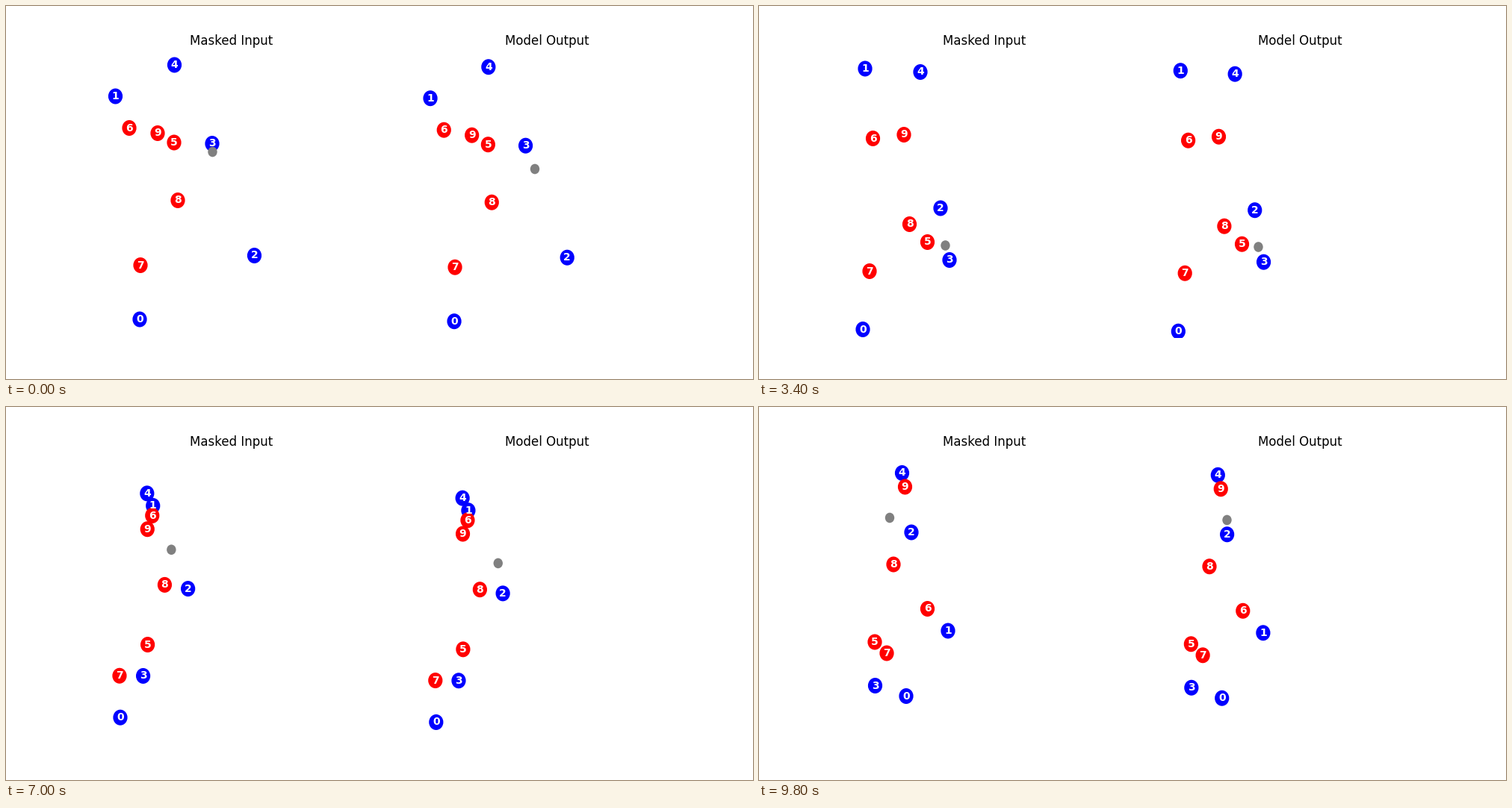
Animation, 1000 px wide and 500 px high, one loop 10000 ms. Source, as a matplotlib script:

```python
import numpy as np
import matplotlib.pyplot as plt
from matplotlib.animation import FuncAnimation
from matplotlib.patches import Ellipse

FRAMES, INTERVAL = 50, 200
W, H, DPI = 1000, 500, 100
TOP, BOTTOM = 60, 445
PLAYER_SIZE, BALL_SIZE = (19.2, 21), (12.4, 13.6)

plt.rcParams["font.family"] = "DejaVu Sans"

# Players 0-4 attack and 5-9 defend; each path has one (x, y) per key time.
KEYS = np.array([0, 9, 17, 24, 30, 40, 49])
PLAYERS = [
    [(179, 420), (145, 433), (139, 433.5), (140, 426), (140.5, 426), (170, 403.5), (197, 387.5)],
    [(146.5, 121), (138, 103.5), (142, 84), (144, 80), (156, 98.5), (238.5, 181), (253, 300)],
    [(332.5, 334.5), (258, 335.5), (243, 271), (244.5, 245), (246, 241), (236, 237), (204, 168)],
    [(276, 184.5), (264.5, 277.5), (255, 340.5), (233, 366), (211, 370), (160, 352.5), (155.5, 373.5)],
    [(225.5, 79), (211.5, 80), (216, 88.5), (218.5, 93.5), (195, 119), (189, 103.5), (191.5, 88.5)],
    [(225, 183), (231.5, 262.5), (225.5, 316.5), (211.5, 325.5), (202, 327), (176, 310), (155, 315)],
    [(165, 163.5), (153.5, 179.5), (152.5, 177.5), (156, 154.5), (162.5, 131), (228.5, 180.5), (225.5, 270.5)],
    [(180, 347.5), (154, 342.5), (148, 355.5), (146.5, 346.5), (146, 349), (160, 366), (171, 330)],
    [(230, 260.5), (199, 295.5), (201.5, 292.5), (208.5, 253.5), (210.5, 240), (209.5, 236.5), (180, 211)],
    [(203, 170.5), (188.5, 156), (194, 172.5), (207.5, 149), (200, 154.5), (182, 163.5), (195.5, 107)],
]
BALL_IN = [(276.5, 195.5), (269, 283.5), (249.5, 321), (241.5, 249), (241, 259), (197.5, 121.5), (175, 148.5)]
BALL_OUT = [(708, 218.5), (670, 310), (668.5, 323), (661, 255), (661, 243), (652.5, 174), (626.5, 151.5)]


def smooth_path(points):
    """Cubic Hermite path through the key points, sampled at every frame."""
    p = np.array(points)
    m = np.gradient(p, KEYS, axis=0)
    f = np.arange(FRAMES)
    i = np.clip(np.searchsorted(KEYS, f, side="right") - 1, 0, len(KEYS) - 2)
    h = (KEYS[i + 1] - KEYS[i])[:, None]
    u = (f - KEYS[i])[:, None] / h
    return (p[i] * (1 + 2 * u) * (1 - u) ** 2 + p[i + 1] * u * u * (3 - 2 * u)
            + h * m[i] * u * (1 - u) ** 2 + h * m[i + 1] * u * u * (u - 1))


def predict(path):
    """The model's version: one panel to the right, squeezed and drifting a little."""
    x, y = path.T
    f = np.arange(FRAMES)
    dx = 420.8 + 0.04 * f - 0.015 * (x - 195)
    dy = 2.7 + 3.6 * np.exp(-((f - 35) / 7) ** 2)
    return np.column_stack([x + dx, y + dy])


def add_disc(ax, path, size, color, name=None):
    disc = ax.add_patch(Ellipse(path[0], *size, facecolor=color, edgecolor="none"))
    label = name and ax.text(*path[0], name, color="white", fontsize=10,
                             weight="bold", ha="center", va="center")
    return disc, label, path


def add_panel(ax, title, players, ball):
    box = ax.get_position()
    ax.set_xlim(box.x0 * W, box.x1 * W)
    ax.set_ylim(BOTTOM, TOP)
    ax.axis("off")
    ax.set_title(title, fontsize=12)
    discs = [add_disc(ax, path, PLAYER_SIZE, "blue" if n < 5 else "red", str(n))
             for n, path in enumerate(players)]
    return discs + [add_disc(ax, ball, BALL_SIZE, "gray")]


fig, (left, right) = plt.subplots(1, 2, figsize=(W / DPI, H / DPI), dpi=DPI)
fig.subplots_adjust(left=0.125, right=0.9, bottom=0.11, top=0.88, wspace=0.2)

paths = [smooth_path(points) for points in PLAYERS]
discs = add_panel(left, "Masked Input", paths, smooth_path(BALL_IN))
discs += add_panel(right, "Model Output", [predict(p) for p in paths], smooth_path(BALL_OUT))


def draw(frame):
    for disc, label, path in discs:
        disc.center = path[frame]
        if label:
            label.set_position(path[frame])
    return []


anim = FuncAnimation(fig, draw, frames=FRAMES, interval=INTERVAL, repeat=True, repeat_delay=0)
plt.show()
```
